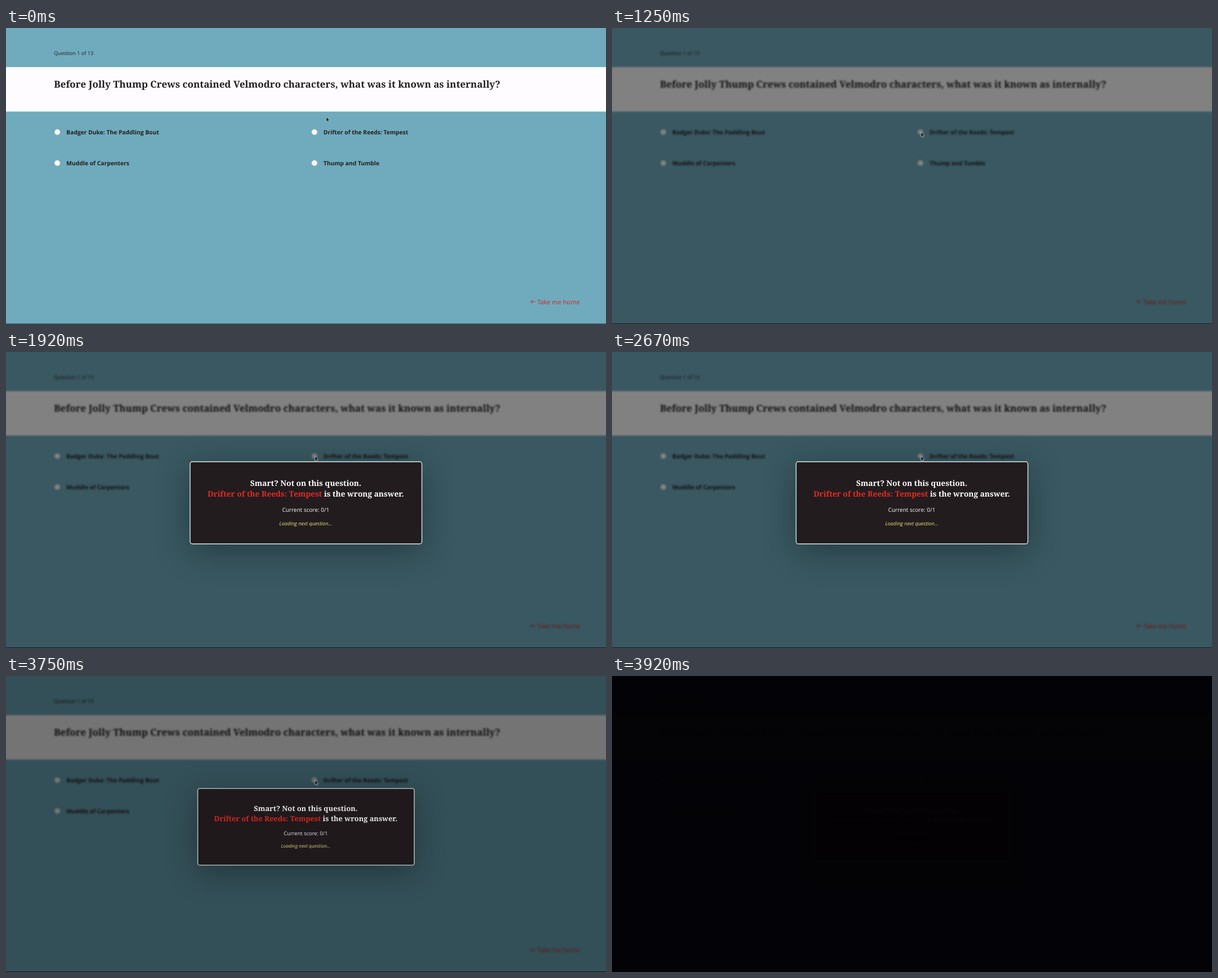
These frames come from a looping animation (1064 px wide and 526 px high, 4000 ms). An HTML page:

```html
<!DOCTYPE html>
<html lang="en">
<head>
<meta charset="utf-8">
<title>Quiz</title>
<style>
  html, body { margin: 0; width: 100%; height: 100%; overflow: hidden; background: #030205; }
  svg { display: block; width: 100%; height: 100%; }
  text { font-family: "Open Sans", "Noto Sans", sans-serif; fill: #231f20; text-rendering: geometricPrecision; white-space: pre; }
  .slab { font-family: "Noto Serif", "Liberation Serif", serif; font-weight: 700; }
  .title { font-size: 17px; }
  .count { font-size: 9.1px; }
  .option { font-size: 10.3px; font-weight: 700; }
  .home { font-size: 11.1px; fill: #d8261c; }
  #modal { transform-origin: 532px 268px; }
  #modal text { text-anchor: middle; fill: #fff; }
  #modal .slab { font-size: 13.7px; }
  #modal .score { font-size: 10px; }
  #modal .loading { font-size: 9px; font-style: italic; fill: #e6e67c; }
  .box { fill: #231c1f; stroke: #dbe7ea; stroke-width: 1.4; filter: drop-shadow(0 13px 28px rgba(0, 0, 0, .32)); }
  .wrong { fill: #e52b20; }
</style>
</head>
<body>
<svg viewBox="0 0 1064 526">
  <g id="page">
    <rect x="-40" y="-40" width="1144" height="606" fill="#6fabbd"/>
    <rect x="-40" y="69.5" width="1144" height="79" fill="#fefcfe"/>
    <text class="count" x="85" y="47.5">Question 1 of 13</text>
    <text class="slab title" x="85" y="106">Before Jolly Thump Crews contained Velmodro characters, what was it known as internally?</text>
    <g id="options"></g>
    <path d="M938.8 486.5H930.8M934.2 483L930.6 486.5L934.2 490" fill="none" stroke="#d8261c"/>
    <text class="home" x="942" y="490.5">Take me home</text>
  </g>
  <rect id="shade" width="1064" height="526" opacity="0"/>
  <rect id="edge" y="525" width="1064" height="1" fill="#2f5f60"/>
  <g id="modal" opacity="0">
    <rect class="box" x="326.5" y="195" width="411" height="146" rx="4"/>
    <text class="slab" x="531.5" y="238">Smart? Not on this question.</text>
    <text class="slab" x="531.5" y="257"><tspan class="wrong">Drifter of the Reeds: Tempest</tspan> is the wrong answer.</text>
    <text class="score" x="531.5" y="284">Current score: 0/1</text>
    <text class="loading" x="531.5" y="308">Loading next question...</text>
  </g>
  <path id="cursor" d="M0 0V8.4L1.9 6.7L3.2 9.6L4.6 9L3.3 6.2H5.9Z" fill="#0a0a0c" stroke="#e8eef0" stroke-width=".6"/>
  <rect id="blackout" width="1064" height="526" fill="#030205" opacity="0"/>
</svg>
<script>
const LOOP = 4000;
const byId = id => document.getElementById(id);

const options = [
  [91, 185, 'Badger Duke: The Paddling Bout'],
  [547, 185, 'Drifter of the Reeds: Tempest'],
  [91, 240, 'Muddle of Carpenters'],
  [547, 240, 'Thump and Tumble']
];
byId('options').innerHTML = options.map(([x, y, label]) => `
  <circle cx="${x}" cy="${y}" r="5" fill="#fefcfe" stroke="#a9bfc7" stroke-width=".6"/>
  <text class="option" x="${x + 16}" y="${y + 4}">${label}</text>`).join('');

// Each step is [time in ms, ...values]; a pose holds until the next step.
function play(id, steps, pose) {
  const all = [...steps, [LOOP, ...steps[steps.length - 1].slice(1)]];
  const frames = all.map(([time, ...values]) =>
    ({ offset: time / LOOP, easing: 'step-end', ...pose(...values) }));
  byId(id).animate(frames, { duration: LOOP, iterations: Infinity });
}

const fade = opacity => ({ opacity });

play('cursor', [
  [0, 568, 158], [170, 567, 160], [250, 565, 167], [330, 562, 176],
  [420, 558, 183], [500, 556, 184], [670, 551, 185], [750, 548, 185]
], (x, y) => ({ transform: `translate(${x}px, ${y}px)` }));

play('page', [[0, 0], [1250, 1.6]], r => ({ filter: r ? `blur(${r}px)` : 'none' }));
play('shade', [[0, 0], [1250, .49]], fade);
play('edge', [[0, '#2f5f60'], [1250, '#101a1c']], fill => ({ fill }));

play('modal', [
  [0, 0, .8], [1580, .12, .84], [1670, .55, .92], [1750, .86, .97],
  [1830, .97, .99], [1920, 1, 1],
  [3670, 1, .985], [3750, 1, .934], [3830, 1, .885], [3920, 1, .83]
], (opacity, size) => ({ opacity, transform: `scale(${size})` }));

play('blackout', [[0, 0], [3670, .02], [3750, .1], [3830, .5], [3920, .985]], fade);
</script>
</body>
</html>
```
